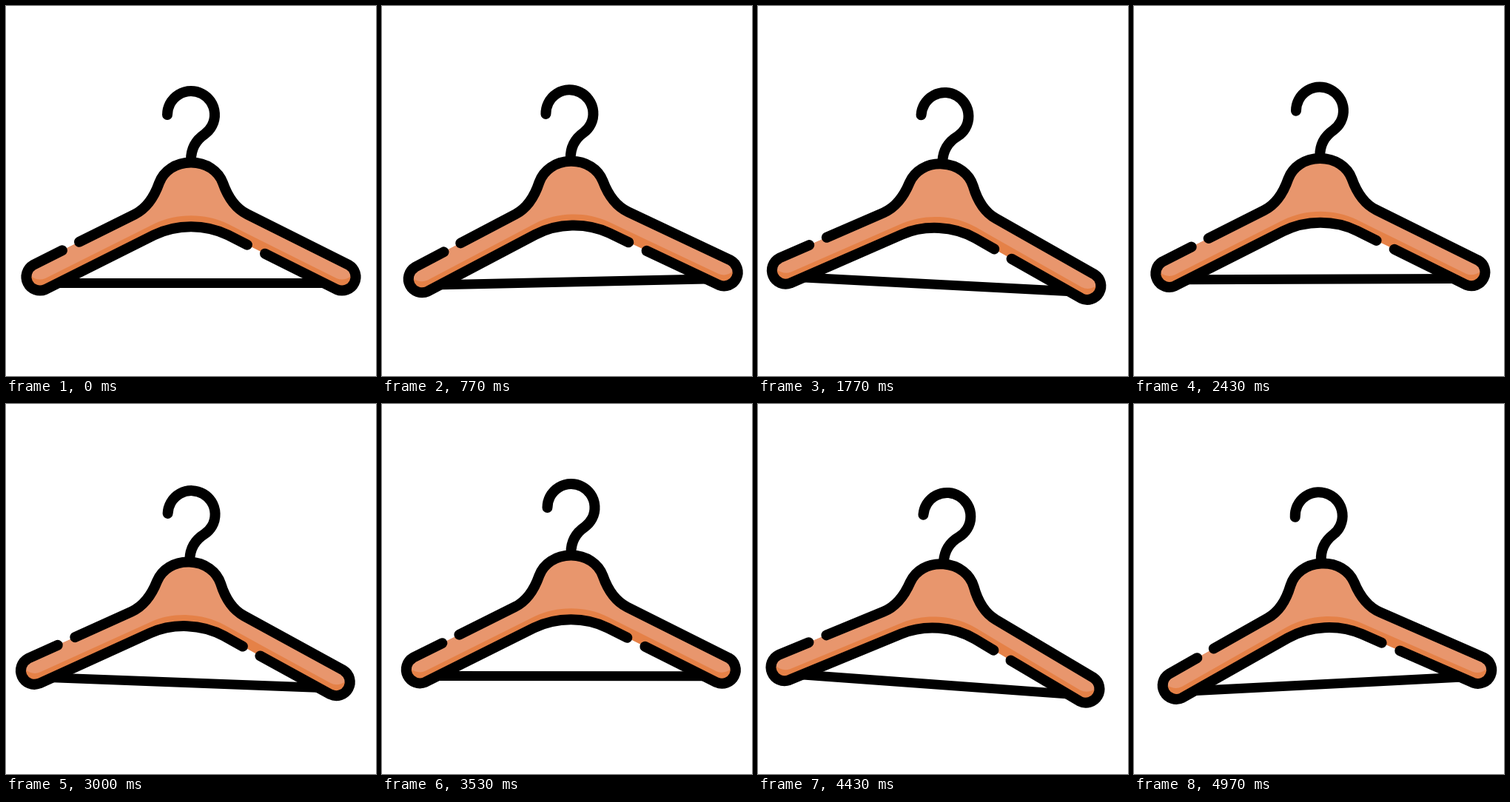
An HTML page that plays this animation: 500 by 500 pixels, repeating every 5010 ms.

```html
<!DOCTYPE html>
<html lang="en">
<head>
<meta charset="utf-8">
<title>Swaying hanger</title>
<style>
  html, body { margin: 0; width: 100%; height: 100%; overflow: hidden; background: #fff; }
  svg { display: block; width: 100%; height: 100%; }
  .line { fill: none; stroke: #000; stroke-width: 14; stroke-linecap: round; stroke-linejoin: round; }
  .bar { stroke-width: 13; stroke-linecap: butt; }
</style>
</head>
<body>
<svg viewBox="0 0 500 500">
  <clipPath id="inside"><path class="body"/></clipPath>
  <g id="hanger">
    <path class="line bar" d="M72 374.6H428"/>
    <path class="line" d="M218 147A32 32 0 1 1 268.4 173.2C257 181 250 192 250 208"/>
    <path class="body" fill="#e58147"/>
    <g clip-path="url(#inside)"><path class="body" fill="#e8966d" transform="translate(0 -15)"/></g>
    <path class="line" id="top"/>
    <path class="line" id="bottom"/>
  </g>
</svg>
<script>
  const LOOP = 5010, STEP = 100 / 3, LAST = 149;

  // The outline is two strokes with a gap on each arm; joined, they bound the body.
  const top_ = "99 318.8L174 281.4C191 273 201 256 207 239C213 223 229 211.5 250 211.5"
    + "S287 223 293 239C299 256 309 273 326 281.4L463.3 350A18.5 18.5 0 0 1 446.7 383L350 334.7";
  const bottom = "326 322.7L300 309.6C284 301.6 267 298.2 250 298.2"
    + "S216 301.6 200 309.6L53.3 383A18.5 18.5 0 0 1 36.7 350L76 330.3";

  const hanger = document.getElementById("hanger");
  document.getElementById("top").setAttribute("d", "M" + top_);
  document.getElementById("bottom").setAttribute("d", "M" + bottom);
  for (const el of document.querySelectorAll(".body")) {
    el.setAttribute("d", `M${top_}L${bottom}Z`);
  }

  // Turning points of the sway: [time in ms, value]
  const swayX = [[0, 0], [620, 6.2], [1600, -3.3], [2430, 1.4], [2930, -3.5], [3650, 6], [4200, -4], [4970, 5]];
  const swayY = [[0, 0], [450, -3], [770, -1.7], [1070, -3], [1600, 3], [2330, -6], [2950, 2.2], [3530, -7], [4400, 4.7], [4970, 4]];
  const tilt = [[0, 0], [700, -1.35], [1480, 4.4], [2280, -0.6], [2930, 2.2], [3650, -0.1], [4380, 4.3], [4970, -2.95]];

  // Sine easing from one turning point to the next
  function ease(turns, t) {
    const i = Math.max(1, turns.findIndex(turn => turn[0] >= t));
    const [t0, a] = turns[i - 1], [t1, b] = turns[i];
    return a + (b - a) * (1 - Math.cos(Math.PI * (t - t0) / (t1 - t0))) / 2;
  }

  function draw() {
    const step = Math.min(LAST, Math.floor((performance.now() % LOOP + 5) / STEP));
    const t = Math.min(step * STEP, 4970);
    const x = ease(swayX, t), y = ease(swayY, t), angle = ease(tilt, t);
    hanger.setAttribute("transform", `translate(${x} ${y}) rotate(${angle} 250 250)`);
    requestAnimationFrame(draw);
  }
  draw();
</script>
</body>
</html>
```
